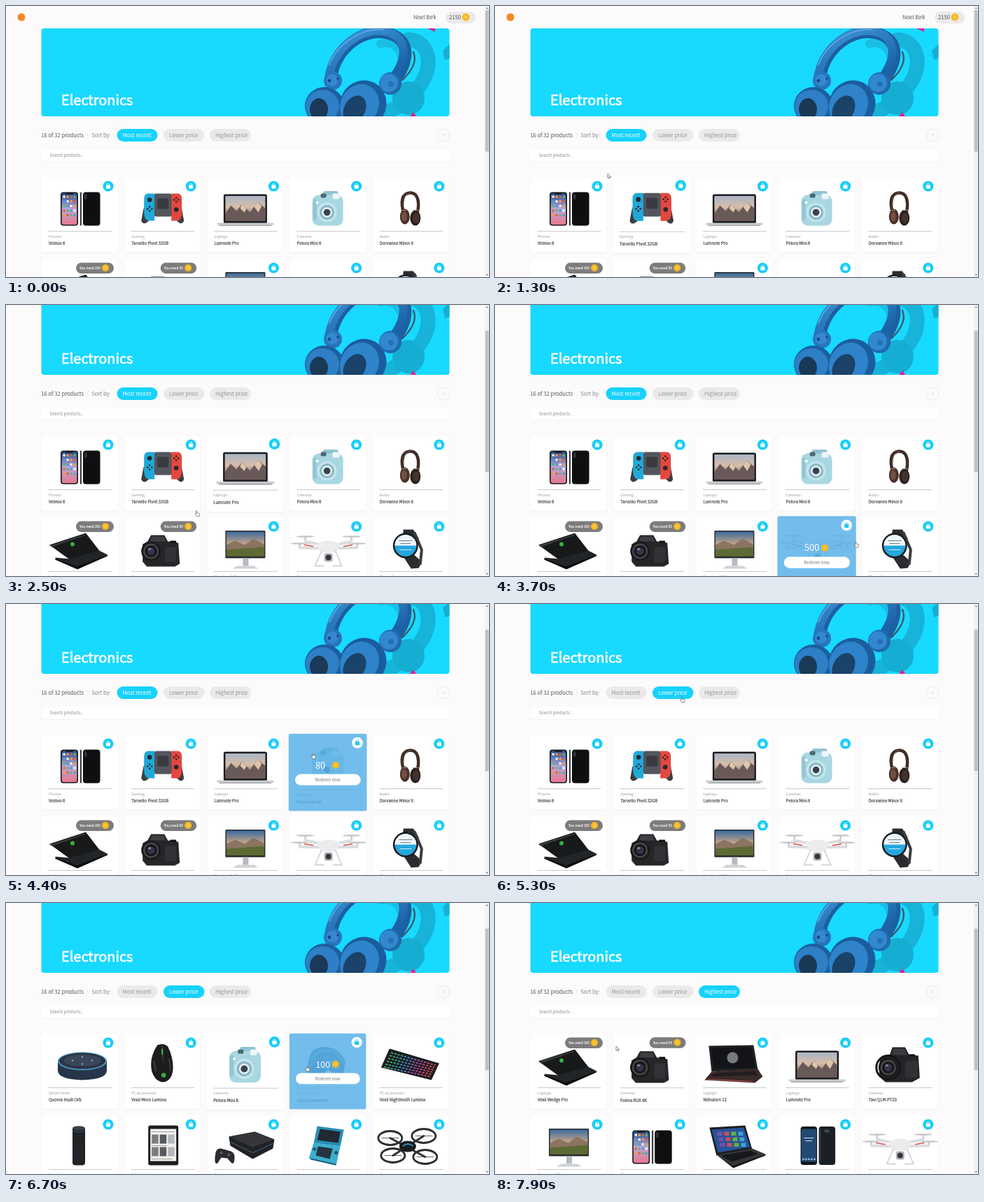
These frames come from a looping animation (690x388 px, 8000 ms). An HTML page:

```html
<!DOCTYPE html>
<html lang="en">
<head>
<meta charset="utf-8">
<title>Electronics shop</title>
<style>
html, body { margin: 0; width: 100%; height: 100%; overflow: hidden; background: #fcfafa; }
svg { display: block; width: 690px; height: 388px; }
text { font-family: "Noto Sans CJK SC", "Noto Sans CJK JP", "Noto Sans CJK", "Lato", sans-serif; font-size: 7.6px; fill: #555; }
.title { font-size: 19.9px; fill: #fff; stroke: #fff; stroke-width: .7px; }
.hint { font-size: 5.8px; fill: #888; }
.kind { font-size: 5.2px; fill: #999; }
.name { font-size: 5.85px; fill: #444; stroke: #444; stroke-width: .2px; }
.need { font-size: 4.9px; fill: #fff; stroke: #fff; stroke-width: .12px; }
.price { font-size: 12.4px; fill: #fff; }
.redeem { font-size: 5.8px; fill: #777; text-anchor: middle; }
</style>
</head>
<body>
<svg id="stage" viewBox="0 0 690 388">
  <defs>
    <clipPath id="bannerClip"><rect x="50.5" y="32" width="583" height="126" rx="4"/></clipPath>
    <linearGradient id="app" x2="0" y2="1"><stop stop-color="#27508f"/><stop offset=".5" stop-color="#b9a6d6"/><stop offset="1" stop-color="#e8788d"/></linearGradient>
    <linearGradient id="hills" x2="0" y2="1"><stop stop-color="#a9b6c6"/><stop offset=".45" stop-color="#d8bda8"/><stop offset="1" stop-color="#473f46"/></linearGradient>
    <linearGradient id="field" x2="0" y2="1"><stop stop-color="#3a6a9c"/><stop offset=".5" stop-color="#c5a58a"/><stop offset="1" stop-color="#4d5b2f"/></linearGradient>
    <linearGradient id="keys"><stop stop-color="#3fae5a"/><stop offset=".35" stop-color="#2f8ec9"/><stop offset=".65" stop-color="#b044a8"/><stop offset="1" stop-color="#d84a4a"/></linearGradient>
    <linearGradient id="blue" x2=".6" y2="1"><stop stop-color="#3d97da"/><stop offset="1" stop-color="#1c62a8"/></linearGradient>
  </defs>
  <rect width="690" height="388" fill="#fcfafa"/>
  <g id="page"></g>
  <rect x="684" width="6" height="388" fill="#f3f2f2"/>
  <path d="M685.5 4 l1.7 -2 l1.7 2z M685.5 384 l1.7 2 l1.7 -2z" fill="#777"/>
  <rect id="thumb" x="684.6" y="6" width="5" height="202.5" fill="#c2c1c1"/>
  <g id="cursor">
    <path id="arrow" d="M0 0V6.4L1.5 5 2.5 7.1 3.5 6.7 2.6 4.6H4.6Z" fill="#fff" stroke="#333" stroke-width=".55"/>
    <path id="hand" d="M0 .7Q.7 -.4 1.4 .7V3L4.4 3.7Q5.2 4 5 5L4.5 8H.9L-1.4 4.8Q-1.2 3.9 0 4.7Z" fill="#fff" stroke="#333" stroke-width=".55"/>
  </g>
</svg>
<script>
const $ = id => document.getElementById(id);
const rect = (x, y, w, h, fill, r = 0, more = "") =>
  `<rect x="${x}" y="${y}" width="${w}" height="${h}" rx="${r}" fill="${fill}" ${more}/>`;
const disc = (x, y, r, fill, more = "") => `<circle cx="${x}" cy="${y}" r="${r}" fill="${fill}" ${more}/>`;
const oval = (x, y, rx, ry, fill, more = "") => `<ellipse cx="${x}" cy="${y}" rx="${rx}" ry="${ry}" fill="${fill}" ${more}/>`;
const shape = (d, fill) => `<path d="${d}" fill="${fill}"/>`;
const line = (d, color, w = 1, more = "") =>
  `<path d="${d}" fill="none" stroke="${color}" stroke-width="${w}" stroke-linecap="round" ${more}/>`;
const text = (x, y, cls, s) => `<text x="${x}" y="${y}" class="${cls}">${s}</text>`;
const coin = (x, y, r) => disc(x, y, r, "#f8bb22") + disc(x, y, r * .62, "#fbc93c", 'stroke="#e9a014" stroke-width=".5"');
const repeat = (n, f) => Array.from({ length: n }, (_, i) => f(i)).join("");
const bag = (disk, ink) => disc(95, 12.5, 7.6, disk) + rect(92, 11, 6, 5, ink, .7) +
  line("M93.4 11.4V10.4a1.6 1.6 0 0 1 3.2 0V11.4", ink, .8);

// Product pictures in card coordinates, about 108 x 77
const iconGrid = repeat(20, i => rect(30.5 + i % 4 * 5, 26 + (i >> 2) * 6.6, 3.2, 3.2,
  ["#f4f4f4", "#4fc06a", "#f0a13a", "#4a9be0", "#e45757"][i * 7 % 5], .8));
const camera = body => body +
  disc(38, 48, 14, "#1b1b1c") + disc(38, 48, 11, "#47474a") + disc(38, 48, 8.6, "#161619") +
  disc(38, 48, 5.5, "#35334a") + oval(36, 45, 2.2, 1.5, "#8d86a8");
const rotor = (x, y, w, fill) => oval(x, y, w, 1.3, fill) + rect(x - 1.2, y, 2.4, 6, fill, 1);

const art = {
  phone: rect(27, 21, 25, 48, "#17181b", 4) + rect(28.6, 22.6, 21.8, 44.8, "url(#app)", 2.6) + iconGrid +
    rect(34, 22, 11, 2.2, "#17181b", 1) + rect(54.8, 21, 2.2, 48, "#3c3d41", 1) +
    rect(59, 21, 24.5, 48, "#0e0f11", 4) + rect(61, 23.5, 3.4, 8, "#33363b", 1.7),
  console: shape("M36 25H74L82 46 85 62Q82 69 76 63L70 55H40L34 63Q27 69 24 62L27 46Z", "#3c3e43") +
    shape("M33 23H43V62H34Q28 60 28 50V31Q28 24 33 23Z", "#20a9d8") +
    shape("M67 23H77Q82 24 82 31V50Q82 60 76 62H67Z", "#e4473f") +
    rect(43, 23, 24, 33, "#53565c", 2) + rect(47, 30, 16, 15, "#393b40", 2) +
    disc(36, 32, 3.3, "#26282c") + disc(74, 46, 3.3, "#26282c") +
    repeat(4, i => disc(36 + [0, 3, 0, -3][i], 45 + [-3, 0, 3, 0][i], 1.3, "#222") +
      disc(74 + [0, 3, 0, -3][i], 32 + [-3, 0, 3, 0][i], 1.3, "#222")),
  slim: rect(23.5, 24, 62, 42, "#1a1b1e", 2.5) + rect(26, 26.5, 57, 36, "url(#hills)") +
    shape("M26 52 34 40 42 48 50 38 61 50 72 35 83 44V62.5H26Z", "#695a59") +
    shape("M50 38 56 45 53 50 47 44ZM72 35 78 41 73 50 67 42Z", "#e0c5ac") +
    rect(14, 65, 81, 3, "#c9cbce", 1) + rect(17, 68, 75, 1.3, "#8f9195", 1),
  instant: rect(47, 19.5, 22, 12, "#8fc3d1", 3) + rect(32, 25, 44, 44, "#a8d7e2", 9) +
    rect(33, 31, 5, 30, "#92c5d3", 2.5) + rect(61, 23, 10, 8, "#eef5f7", 2) + rect(44, 23, 8, 6, "#4b6974", 2) +
    disc(53, 50, 14, "#c3e5ec") + disc(53, 50, 10.5, "#8ab7c4") + disc(53, 50, 7.5, "#e5eef0") +
    disc(53, 50, 4.8, "#35444d") + disc(39, 36, 2, "#fff"),
  headset: line("M45 54C39 34 42 23 53 22 65 21 68 36 63 54", "#3f2d27", 4.5) +
    line("M44 40C44 27 48 23 54 22", "#75594c", 1) + oval(46, 56, 7, 11, "#4b3028") + oval(61, 58, 7.5, 11, "#2c211f") +
    oval(45, 56, 4, 7, "#72503f") + oval(62, 58, 4.6, 7.5, "#42332f") + line("M42 47H48M58 47H66", "#a08a68", 1),
  blade: shape("M11 39 63 22 83 48 40 60Z", "#17191b") + shape("M12 40 62 24 63 25 14 42Z", "#3c4041") +
    shape("M40 59 82 47 94 53 51 72 18 57Z", "#222527") + shape("M20 58 50 70 94 53V55L51 74 19 60Z", "#0c0d0d") +
    disc(44, 38, 3, "#35b13b"),
  dslr: camera(shape("M26 38 33 34 38 25H57L62 34 77 36 79 66 72 70H32L26 63Z", "#252628") +
    shape("M39 27H56L59 34H37Z", "#3e3f42") + rect(65, 33, 9, 3, "#111", 1) + rect(58, 42, 16, 22, "#323336", 3)),
  bridge: camera(shape("M26 34 40 30 44 19H62L68 30 81 31 83 63 72 69H34L25 61Z", "#232426") +
    shape("M46 21H61L65 30H43Z", "#3a3b3e") + rect(68, 29, 8, 3, "#0e0e0f", 1) + rect(62, 38, 18, 25, "#303134", 3)) +
    disc(38, 48, 17, "none", 'stroke="#151516" stroke-width="3"'),
  monitor: rect(26, 18.5, 57, 39.5, "#27292d", 1) + rect(27.5, 20, 54, 35.5, "url(#field)") +
    shape("M27.5 39 40 33 54 39 66 30 81.5 38V46H27.5Z", "#8b7460") + shape("M27.5 46 81.5 42V55.5H27.5Z", "#5d6a34") +
    rect(51, 58, 8, 11, "#b7bbc0") + shape("M43 69H67L73 73H37Z", "#cfd2d6"),
  drone: [[22, 27], [88, 27], [14, 37], [96, 37]].map(p => rotor(p[0], p[1], 13, "#c6c6c8")).join("") +
    line("M55 41 22 34M55 41 88 34M55 44 14 43M55 44 96 43", "#dcdcdf", 4) +
    shape("M38 38Q55 28 72 38L66 50H44Z", "#ececef") + line("M21 39 33 41M77 41 89 39", "#d8534e", 1.6) +
    line("M45 48 36 69H48M65 48 74 69H62", "#d4d4d7", 1.8) + rect(49, 51, 12, 12, "#b2b2b7", 3) + disc(55, 57, 4, "#34353a"),
  watch: shape("M44 17H58L66 30 62 36H42Z", "#2b2c2f") + shape("M40 50 58 52 70 63 66 72 55 73Z", "#2b2c2f") +
    line("M60 22 70 46 68 66", "#3b3c40", 4) + disc(47, 40, 18, "#1b1c1f") + disc(47, 40, 15.5, "#25a7df") +
    shape("M31.5 40a15.5 15.5 0 0 1 31 0Z", "#eef5f8") + line("M38 33H56M40 37H54", "#6d7d85", 1) + line("M39 46H55", "#c6ecfa", 1),
  puck: shape("M23 39V53Q24 65 58 66 92 65 93 53V39Z", "#26364a") + oval(58, 39, 35, 13, "#4a93c0") +
    oval(58, 38.6, 33, 11.5, "#2b3442") + oval(58, 38, 27, 8.5, "#39475a") +
    repeat(4, i => disc(58 + [0, 14, 0, -14][i], 38 + [-5, 0, 5, 0][i], 1.2, "#94a2b1")),
  mouse: shape("M47 16Q56 12 62 18 71 36 69 54 66 69 54 69 43 67 39 53 35 34 47 16Z", "#1c1d1f") +
    line("M54 16 55 40", "#46484b", 1) + line("M54 22V29", "#38c447", 2) + line("M42 39 45 53M64 36 66 52", "#393c3e", 2) +
    disc(56, 59, 3.2, "#35b13b"),
  goggles: shape("M27 39Q29 21 48 19 70 19 79 39L76 57Q70 64 63 57L54 51 45 61Q34 68 25 58Z", "#30557c") +
    line("M30 38Q37 24 54 24 68 25 76 41", "#517ba4", 4) + oval(39, 50, 8, 8, "#203c59"),
  keyboard: shape("M24 21 95 42 84 66 12 48Z", "#1d1e20") +
    repeat(6, i => line(`M${27 - i * 2} ${27 + i * 4.1} L${89 - i * 1.5} ${44.5 + i * 3.3}`, "url(#keys)", 2, 'stroke-dasharray="1.5 3.4"')),
  tower: rect(44, 16, 18, 55, "#202226", 4) + oval(53, 18, 9, 3.2, "#3c4046") +
    repeat(9, i => line(`M46 ${41 + i * 2.7}H60`, "#34373c", 1, 'stroke-dasharray=".1 2"')) + line("M45 22Q53 25 61 22", "#3c7a98", .7),
  tablet: rect(34, 14, 43, 57, "#1c1d1f", 3) + rect(37, 19, 37, 46, "#f0f0ee") +
    repeat(6, i => rect(39 + i % 3 * 11.5, 27 + (i / 3 | 0) * 18, 9.5, 13, ["#7b7d80", "#b6b7b8", "#565a5f"][i * 5 % 3])) +
    line("M39 23H71M39 43H60M39 62H68", "#888", .8),
  deck: shape("M31 30 68 23 96 34 94 47 65 62 33 43Z", "#202225") + shape("M31 30 68 23 96 34 64 45Z", "#34363a") +
    line("M34 38 65 53 94 40", "#5689ad", .7) +
    shape("M12 54Q13 46 20 47L34 51Q40 53 39 63 38 72 33 66L29 61 20 60 15 68Q9 71 12 54Z", "#292b2f") +
    disc(20, 53, 2.2, "#55585d") + disc(31, 56, 2.2, "#55585d"),
  handheld: shape("M39 15 77 20 72 44 34 39Z", "#278eb2") + shape("M43 19 72 23 69 39 39 35Z", "#202932") +
    shape("M34 39 72 44 66 71 27 61Z", "#3baecd") + shape("M40 44 61 47 57 62 37 57Z", "#253440") +
    disc(35, 48, 2.4, "#24556b") + disc(66, 53, 2.6, "#24556b") + line("M30 62 65 70", "#17637e", 2),
  quad: [[25, 32], [73, 29], [29, 57], [75, 59]].map(p =>
    oval(p[0], p[1], 17, 10, "none", 'stroke="#2b2d30" stroke-width="2.8"') + line(`M${p[0] - 12} ${p[1]}h24`, "#606368", 1)).join("") +
    line("M25 32 75 59M73 29 29 57", "#303236", 3) + oval(50, 44, 12, 8, "#1a1b1d") + line("M44 43Q50 38 57 43", "#3590cb", 2),
  gaming: shape("M18 17 82 16 88 51 22 54Z", "#1e2023") + shape("M21 20 79 19 84 48 25 50Z", "#121417") +
    disc(52, 34, 8, "#77797b") + shape("M22 54 88 50 95 61 84 70 12 66Z", "#3b2a29") +
    shape("M27 56 84 53 88 59 20 61Z", "#211e20") + line("M17 65 80 68", "#bc514a", 1),
  tiles: shape("M19 17 70 14 80 48 29 57Z", "#1c1e21") + shape("M22 20 68 17 77 45 31 53Z", "#27539a") +
    repeat(12, i => rect(30 + i % 4 * 10 + (i >> 2) * 2, 23 + (i >> 2) * 8, 7, 5.5, ["#7b4fa5", "#37a8d0", "#68ae45", "#c74e5a"][i * 3 % 4])) +
    shape("M29 56 80 47 99 55 53 73Z", "#34363a") + shape("M35 57 78 50 88 55 50 66Z", "#17181a") + shape("M29 56 53 72 99 55V57L53 75Z", "#101113"),
  glass: rect(31, 15.5, 23.5, 55, "#111418", 4) + rect(32, 19, 21.5, 47, "#234a72", 2) + line("M36 32H49M38 36H47", "#d2e4f3", 1) +
    repeat(5, i => rect(33.5 + i * 4, 61, 2.6, 2.6, "#8ab8d8", .7)) + rect(57, 15.5, 23.5, 55, "#1b2026", 4) +
    rect(65, 20, 7, 4, "#454b53", 1) + line("M59 19V66", "#3e4a56", 1)
};

// picture, category, name, points, points missing
const recent = [
  ["phone", "Phones", "Velmio 8", 400], ["console", "Gaming", "Tarvello Pivot 32GB", 300],
  ["slim", "Laptops", "Lumnote Pro", 1500], ["instant", "Cameras", "Pelora Mini 8", 80],
  ["headset", "Audio", "Dorvanne Minor ll", 200], ["blade", "Laptops", "Vexil Wedge Pro", 2500, 350],
  ["dslr", "Cameras", "Folma RUX 4K", 2200, 50], ["monitor", "Monitors &amp; TV", "", 500],
  ["drone", "Drones", "", 500], ["watch", "Phone Accessories", "", 250]
];
const [phone, , slim, instant, , blade, dslr, monitor, drone] = recent;
const lists = [
  recent,
  [["puck", "Smart Home", "Quorva Hush Orb", 50], ["mouse", "PC Accessories", "Vexil Moro Lumina", 80], instant,
    ["goggles", "Monitors &amp; TV", "Tublix Viewloom", 100], ["keyboard", "PC Accessories", "Vexil Nightmoth Lumina", 150],
    ["tower", "Smart Home", "", 150], ["tablet", "Tablets &amp; E-readers", "", 150], ["deck", "Gaming", "", 200],
    ["handheld", "Gaming", "", 200], ["quad", "Drones", "", 200]],
  [blade, dslr, ["gaming", "Laptops", "Nebulorn 13", 1800], slim, ["bridge", "Cameras", "Tavi QLM-PT20", 1200],
    monitor, phone, ["tiles", "Laptops", "", 500], ["glass", "Phones", "", 500], drone]
];

const needPill = n => {
  const x = n > 99 ? 49 : 51.5;
  return rect(x, 5, 103 - x, 15.5, "#7d7c7d", 7.75) + text(x + 5, 14.6, "need", "You need " + n) + coin(91, 12.5, 5);
};
const overlay = points => `<g class="over" opacity="0">${rect(0, 0, 108, 107, "#5bb3e9", 2.5, 'fill-opacity=".86"')}` +
  bag("#fff", "#1cc9f6") + text(points > 999 ? 30 : 37, 48.2, "price", points) + coin(65, 43.5, 5) +
  rect(9, 56, 90.5, 15.5, "#fff", 7.75) + text(54, 66, "redeem", "Redeem now") + "</g>";
const card = ([pic, kind, name, points, missing]) => '<g class="card">' +
  rect(-.5, .5, 109, 108, "#f5f3f3", 3) + rect(0, 0, 108, 107, "#fff", 2.5) + art[pic] + line("M10 77H100", "#b5b4b4", .7) +
  text(10, 86, "kind", kind) + text(10, 96.8, "name", name) +
  (missing ? needPill(missing) : bag("#19cdf8", "#fff") + overlay(points)) + "</g>";
const pill = (x, w, label) => `<g class="pill">${rect(x, 176, w, 18, "", 9)}${text(x + 8, 187.8, "", label)}</g>`;

const headphones = line("M575 48C606 50 613 88 588 118 566 148 540 154 520 158", "#17b3d8", 21) +
  oval(575, 132, 23, 24, "#16add2") + line("M535 54C560 48 577 74 557 106", "#19bee4", 12) +
  shape("M602 32H613V37Z", "#e0218a") + shape("M577 158 582 152 586 158Z", "#e0218a") + shape("M634 54 624 64 627 77 634 75Z", "#18aed2") +
  line("M582 66C588 79 579 94 566 106", "#43546a", 2.4) + line("M577 66C580 80 573 92 561 103", "#a3bac9", 1.2) +
  line("M464 105C470 60 509 33 540 38 577 44 579 74 555 107", "#1c609f", 17) +
  line("M461 103C468 58 508 31 540 36 574 42 575 73 552 104", "url(#blue)", 12) +
  line("M462 84C474 52 510 31 539 34", "#61afe3", 1.4) +
  disc(467, 107, 13, "#2775bd") + disc(466, 106, 8.5, "#3488cf") + disc(462, 107, 2.4, "#174b80") + disc(474, 104, 1.8, "#174b80") +
  oval(455, 143, 28, 27, "#1c5f9f") + oval(452, 143, 24, 23, "#2e7fc6") + oval(447, 148, 13, 16, "#193957") +
  oval(510, 141, 33, 35, "#1a5d9e", 'transform="rotate(28 510 141)"') +
  oval(505, 142, 27, 31, "#2e83ca", 'transform="rotate(28 505 142)"') +
  oval(498, 148, 15, 21, "#1b4268", 'transform="rotate(28 498 148)"') +
  disc(549, 111, 16, "#2069ad") + disc(547, 110, 13, "#3288cf") + disc(550, 112, 4, "#2670b4");

$("page").innerHTML =
  disc(22, 16, 5.5, "#f58a1f") + text(582, 18.8, "", "Noel Birk") +
  rect(628, 8, 43, 17, "#ebeaea", 8.5) + text(633, 18.8, "", "2150") + coin(657, 16, 5.4) +
  `<g clip-path="url(#bannerClip)">${rect(50, 32, 584, 126, "#18d9ff")}${headphones}</g>` +
  text(79, 142.3, "title", "Electronics") + text(50.4, 187.8, "", "16 of 32 products") +
  line("M116.8 181V189", "#e6e4e4", .6) + `<g opacity=".7">${text(122.3, 187.8, "", "Sort by:")}</g>` +
  pill(158.5, 58, "Most recent") + pill(225, 58.5, "Lower price") + pill(291, 59, "Highest price") +
  disc(625, 185, 8.8, "none", 'stroke="#e6e4e4" stroke-width=".8"') + line("M624.3 183 626.3 185 624.3 187", "#c5c3c3", .8) +
  rect(50, 206.5, 584, 17, "#f6f4f4", 3) + rect(50.5, 206, 583, 16.5, "#fff", 3) + text(62.8, 216.2, "hint", "Search products...") +
  lists.map(l => `<g class="grid">${l.map(card).join("")}</g>`).join("");

const pills = [...document.querySelectorAll(".pill")];
const grids = [...document.querySelectorAll(".grid")].map(el => ({ el, cards: [...el.children] }));

// time, x, y, hand
const path = [
  [900, 232, 392, 0], [1000, 225, 345, 1], [1150, 185, 280, 1], [1300, 161, 240, 0], [1850, 164, 240, 0],
  [2050, 230, 235, 1], [2250, 320, 240, 1], [2400, 300, 280, 1], [2500, 271.5, 294.5, 1], [2750, 230, 340, 1],
  [3000, 340, 345, 1], [3250, 450, 345, 1], [3700, 514.5, 339, 1], [3900, 522, 320, 0], [4300, 470, 230, 1],
  [4700, 340, 165, 0], [5000, 266, 133, 1], [5700, 266, 133, 1], [6100, 285, 180, 0], [6400, 345, 235, 1],
  [6700, 429, 233, 1], [6900, 415, 190, 1], [7150, 320, 130, 1], [7450, 320, 130, 1], [7700, 240, 172, 0],
  [7900, 173, 205, 0], [8000, 173, 205, 0]
];
// card, enter, leave
const hovers = [
  [1, 1000, 1200], [1, 1900, 2150], [2, 2150, 2400], [6, 2650, 2850], [7, 2850, 3130], [8, 3130, 3850],
  [3, 4150, 4450], [2, 6300, 6600], [3, 6600, 6950], [1, 7850, 8200]
];
const ramp = (t, a, d) => Math.min(1, Math.max(0, (t - a) / d));
const mix = (a, b, k) => a + (b - a) * k;
const stage = (t, a, b) => (t >= a) + (t >= b);

function moveCursor(t) {
  $("cursor").style.display = t < path[0][0] ? "none" : "";
  const i = Math.max(1, path.findIndex(p => p[0] > t));
  const a = path[i - 1], b = path[i], k = ramp(t, a[0], b[0] - a[0]);
  $("cursor").setAttribute("transform", `translate(${mix(a[1], b[1], k)} ${mix(a[2], b[2], k)})`);
  $("hand").style.display = a[3] ? "" : "none";
  $("arrow").style.display = a[3] ? "none" : "";
}

function draw(t) {
  const scroll = 58 * ramp(t, 1500, 300);
  $("page").setAttribute("transform", `translate(0 ${-scroll})`);
  $("thumb").setAttribute("y", 6 + scroll * .53);

  const sort = stage(t, 5100, 7300), shown = stage(t, 5600, 7600);
  pills.forEach((p, i) => {
    p.firstChild.setAttribute("fill", i === sort ? "#16d2fc" : "#ebe9e9");
    p.lastChild.style.fill = i === sort ? "#fff" : "#949393";
  });
  grids.forEach(({ el }, i) => el.style.display = i === shown ? "" : "none");

  grids[shown].cards.forEach((el, i) => {
    let grow = 0, cover = 0;
    for (const [n, a, b] of hovers) if (n === i) {
      grow += ramp(t, a, 300) * (1 - ramp(t, b, 300));
      cover += ramp(t, a, 100) * (1 - ramp(t, b, 100));
    }
    const x = 51 + 118.2 * (i % 5), y = 245.5 + 117 * (i / 5 | 0);
    el.setAttribute("transform", `translate(${x + 54} ${y + 53.5}) scale(${1 + .04 * grow}) translate(-54 -53.5)`);
    el.querySelector(".over")?.setAttribute("opacity", cover);
  });
  moveCursor(t);
}

const start = performance.now();
function tick() {
  const t = (performance.now() - start) % 8000;
  draw(Math.floor(t / 100) * 100);
  requestAnimationFrame(tick);
}
tick();
</script>
</body>
</html>
```
